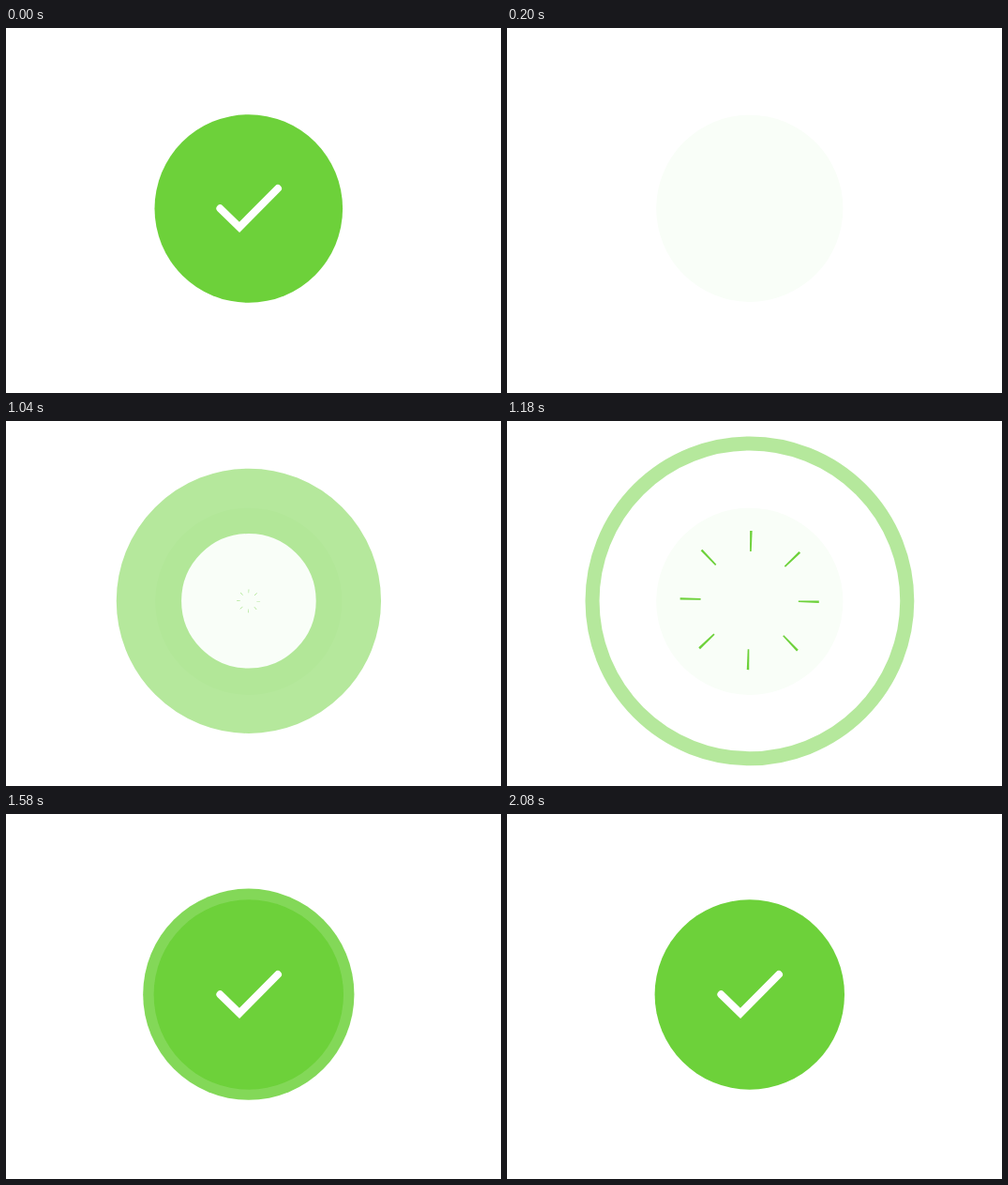
An HTML page that plays this animation: 528 px wide and 389 px high, repeating every 3600 ms.

```html
<!DOCTYPE html>
<html lang="en">
<head>
<meta charset="utf-8">
<title>Success check</title>
<style>
  html, body { margin: 0; width: 100%; height: 100%; overflow: hidden; background: #fff; }
  svg { display: block; width: 100vw; height: 100vh; }
</style>
</head>
<body>
<svg viewBox="0 0 528 389">
  <circle cx="258.8" cy="192.3" r="99.6" fill="#f9fef8"/>
  <circle id="ring" cx="258.9" cy="191.8" fill="none" stroke="#6dd13a" stroke-opacity=".5"/>
  <g id="rays" fill="#6dd13a"></g>
  <g id="badge">
    <circle id="pulse" cx="258.8" cy="192.2" fill="#6dd13a"/>
    <circle id="disc" cx="258.8" cy="192.5" fill="#6dd13a"/>
    <path d="M228.4 192.3L249 212.3L290 171" fill="none" stroke="#fff" stroke-width="8"
          stroke-linecap="round" stroke-linejoin="miter"/>
  </g>
</svg>
<script>
const LOOP = 3600, STEP = 20;
const [ring, rays, badge, pulse, disc] =
  ['ring', 'rays', 'badge', 'pulse', 'disc'].map(id => document.getElementById(id));

const linear = (t, start, end) => Math.min(1, Math.max(0, (t - start) / (end - start)));
const ease = (t, start, end) => {
  const x = linear(t, start, end);
  return x * x * (3 - 2 * x);
};
const set = (el, attrs) => {
  for (const name in attrs) el.setAttribute(name, attrs[name]);
};

// Eight tapered rays around the origin, at the size they reach when fully spread.
for (let i = 0; i < 8; i++) {
  const ray = document.createElementNS('http://www.w3.org/2000/svg', 'path');
  set(ray, { d: 'M-2 -127L2 -127L3 -180.5L-3 -180.5Z', transform: `rotate(${i * 45 + 1.3})` });
  rays.append(ray);
}

function drawBurst(t) {
  const outer = 175.4 * ease(t, 820, 1127);
  const inner = 172.6 * ease(t, 882, 1238);
  const fade = 1 - linear(t, 1420, 1560);
  set(ring, { r: (outer + inner) / 2, 'stroke-width': Math.max(0, outer - inner), opacity: fade });

  const spread = ease(t, 960, 1460);
  set(rays, {
    transform: `translate(258.7 ${192 - 2.3 * spread}) scale(${spread})`,
    opacity: spread ? fade : 0
  });
}

function drawBadge(t) {
  const leaving = t < 820;
  const scale = leaving ? 1 : ease(t, 1316, 1516);
  set(badge, {
    opacity: leaving ? 1 - linear(t, 0, 200) : linear(t, 1316, 1516),
    transform: `translate(258.8 195.5) scale(${scale}) translate(-258.8 -195.5)`
  });
  set(disc, { r: leaving ? 100.3 : 101.2 });

  const wave = ease(t, 1412, 2080);
  set(pulse, { r: 100 + 80 * wave, opacity: leaving ? 0 : 1 - wave });
}

const origin = performance.now();
function frame() {
  const elapsed = (performance.now() - origin) % LOOP;
  const t = Math.floor(elapsed / STEP) * STEP;
  drawBurst(t);
  drawBadge(t);
  requestAnimationFrame(frame);
}
frame();
</script>
</body>
</html>
```
